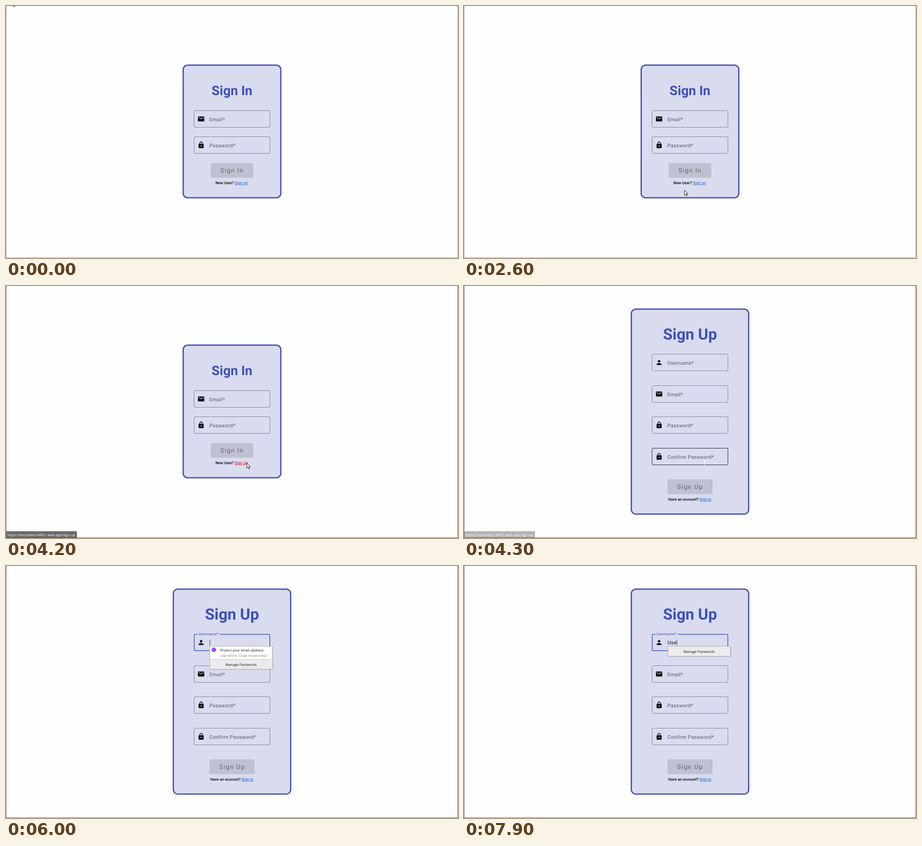
Recreate the animation shown at these times as an HTML page. Size 1001x560 px, loop 8000 ms.

```html
<!DOCTYPE html>
<html lang="en">
<head>
<meta charset="utf-8">
<title>Sign in and sign up</title>
<style>
  html, body { margin: 0; width: 100%; height: 100%; overflow: hidden; background: #fefefe; }
  svg { display: block; width: 100vw; height: 100vh; }
  text { font-family: Roboto, sans-serif; text-rendering: geometricPrecision; white-space: pre; }
  .card { fill: #d9dbef; stroke: #3f51b5; stroke-width: 2.8; }
  .title { font-weight: 700; fill: #3f51b5; text-anchor: middle; }
  .box { fill: none; stroke: rgba(0,0,0,.4); }
  .box.hover { stroke: rgba(0,0,0,.87); }
  .label, .value { font-size: 11.2px; letter-spacing: .36px; }
  .label { fill: #575860; }
  .label.focus { fill: #3f51b5; }
  .value { fill: #111; }
  .button { fill: #bfc1d2; }
  .action { font-size: 14px; font-weight: 500; letter-spacing: 1.3px; fill: #767883; }
  .note { font-size: 8.5px; font-weight: 500; fill: #000; }
  .link { font-size: 8.6px; font-weight: 400; fill: #0f64c8; text-decoration: underline; }
  .link.active { fill: #ee0000; }
  .ui { font-family: "Open Sans", "Noto Sans", sans-serif; font-size: 7.7px; fill: #111; }
  .pop { stroke: #a9aab0; stroke-width: 1; }
  .shade { fill: rgba(0,0,0,.1); }
  .cursor { fill: #fff; stroke: #000; stroke-width: .9; stroke-linejoin: round; }
</style>
</head>
<body>
<svg viewBox="0 0 1001 560" preserveAspectRatio="none">
  <defs>
    <path id="mail" d="M20 4H4c-1.1 0-2 .9-2 2v12c0 1.1.9 2 2 2h16c1.1 0 2-.9 2-2V6c0-1.1-.9-2-2-2zm0 4l-8 5-8-5V6l8 5 8-5v2z"/>
    <path id="lock" d="M18 8h-1V6c0-2.76-2.24-5-5-5S7 3.24 7 6v2H6c-1.1 0-2 .9-2 2v10c0 1.1.9 2 2 2h12c1.1 0 2-.9 2-2V10c0-1.1-.9-2-2-2zm-6 9c-1.1 0-2-.9-2-2s.9-2 2-2 2 .9 2 2-.9 2-2 2zm3.1-9H8.9V6c0-1.71 1.39-3.1 3.1-3.1s3.1 1.39 3.1 3.1v2z"/>
    <path id="person" d="M12 12c2.21 0 4-1.79 4-4s-1.79-4-4-4-4 1.79-4 4 1.79 4 4 4zm0 2c-2.67 0-8 1.34-8 4v2h16v-2c0-2.66-5.33-4-8-4z"/>
  </defs>

  <rect width="1001" height="560" fill="#fefefe"/>
  <path id="frame" d="M.5 0V559.5H1000.5V0" fill="none"/>

  <g id="signIn">
    <rect class="card" x="392.4" y="131.4" width="216.2" height="294.8" rx="10"/>
    <text class="title" x="500.5" y="198" font-size="29">Sign In</text>
    <rect class="button" x="453.3" y="349" width="94.4" height="32.6" rx="2.7"/>
    <text class="action" x="474.5" y="370.4">Sign In</text>
    <text class="note" x="464" y="396.2">New User? <tspan class="link" id="upLink">Sign up</tspan></text>
  </g>

  <g id="signUp">
    <rect class="card" x="370.6" y="51.4" width="259.8" height="455.4" rx="10"/>
    <text class="title" x="500.5" y="119.3" font-size="34.4">Sign Up</text>
    <rect class="button" x="450.6" y="429.6" width="99.8" height="32.8" rx="2.7"/>
    <text class="action" x="472" y="451">Sign Up</text>
    <text class="note" x="452" y="476.7">Have an account? <tspan class="link">Sign In</tspan></text>
  </g>

  <path id="focus" d="M473 151.8H582a2.3 2.3 0 0 1 2.3 2.3V186a2.3 2.3 0 0 1 -2.3 2.3H419a2.3 2.3 0 0 1 -2.3 -2.3V154.1a2.3 2.3 0 0 1 2.3 -2.3H424"
        fill="none" stroke="#3f51b5" stroke-width="1.5"/>
  <text id="typed" class="value" x="450.7" y="174.4"></text>
  <rect id="caret" y="164" width="1" height="13" fill="#333"/>
  <path id="beam" d="M-2 -5.5H2M0 -5.5V5.5M-2 5.5H2" fill="none" stroke="#fff" stroke-opacity=".9"/>

  <g id="popFull">
    <rect class="shade" x="451" y="179" width="141" height="52" rx="2"/>
    <rect class="pop" x="451.5" y="178.5" width="138.5" height="50.5" rx="1.5" fill="#fff"/>
    <path d="M452 207.5H589.5V228.5H452Z" fill="#ececec"/>
    <path d="M452 207.5H589.5" stroke="#c4c4c8"/>
    <circle cx="460.2" cy="186.3" r="5" fill="#a945ea"/>
    <text class="ui" x="474" y="189.8">Protect your email address:</text>
    <text class="ui" x="474" y="202.2" style="fill:#7c7c7c">Use Velirto Cloak email mask</text>
    <text class="ui" x="520.6" y="221.8" text-anchor="middle">Manage Passwords</text>
  </g>
  <g id="popSmall">
    <rect class="shade" x="451" y="179" width="141" height="23" rx="2"/>
    <rect class="pop" x="451.5" y="178.5" width="138.5" height="22" rx="1.5" fill="#ececec"/>
    <text class="ui" x="520.6" y="193" text-anchor="middle">Manage Passwords</text>
  </g>

  <g id="status">
    <rect x="1" y="545" width="156" height="14.5" fill="#2b2b2b"/>
    <text class="ui" x="3" y="555.6" style="font-size:7.8px;fill:#fff">https://reminders-4f421.web.app/sign-up</text>
  </g>

  <path id="arrow" class="cursor" d="M.4 .5V11.6L3 9.3L4.7 13.2L6.4 12.5L4.7 8.6H7.9Z"/>
  <path id="hand" class="cursor" d="M-1 10.3L-3.4 7.4C-4.2 6.2 -2.8 5.2 -1.8 6.2L-.8 7.2V1C-.8 -.3 1.2 -.3 1.2 1V5C1.6 4.2 3 4.3 3.1 5.3C3.6 4.7 4.9 4.9 5 5.9C5.6 5.5 6.9 5.8 6.9 7V10.6C6.9 12.6 5.8 13.4 5.6 15.4H.8C.7 13.2 -.2 11.6 -1 10.3Z"/>
</svg>

<script>
const $ = id => document.getElementById(id);
const LOOP = 8000, STEP = 100;

function add(parent, tag, attrs, text) {
  const el = document.createElementNS("http://www.w3.org/2000/svg", tag);
  for (const key in attrs) el.setAttribute(key, attrs[key]);
  if (text) el.textContent = text;
  return parent.appendChild(el);
}

function addField(group, top, icon, name) {
  const box = add(group, "rect", { class: "box", x: 416.5, y: top + .5, width: 168, height: 37, rx: 2.5 });
  add(group, "use", { href: "#" + icon, transform: `translate(423.7 ${top + 10.6}) scale(.7)` });
  const label = add(group, "text", { class: "label" }, name + "*");
  const field = { top, box, label };
  placeLabel(field, 0);
  return field;
}

// Moves a label from inside its field (0) up to the border (1).
function placeLabel({ top, label }, k) {
  const x = 450.4 - 24 * k, y = top + 24 - 20.6 * k;
  label.setAttribute("transform", `translate(${x} ${y}) scale(${1 - .25 * k})`);
}

addField($("signIn"), 232, "mail", "Email");
addField($("signIn"), 290, "lock", "Password");
const fields = [
  [151, "person", "Username"], [221, "mail", "Email"],
  [290, "lock", "Password"], [360, "lock", "Confirm Password"]
].map(row => addField($("signUp"), ...row));

// Pointer: time, x, y
const path = [
  [300, 13, -11], [1200, 131, 263], [1400, 194, 339], [1500, 194, 339],
  [1600, 225, 361], [2000, 349, 393], [2400, 473, 414], [2500, 473, 414],
  [2900, 533, 393], [4600, 533, 393], [5100, 421, 193], [5500, 460, 173]
];
const typing = [[0, "", 451], [7400, "U", 458.5], [7700, "Us", 465], [7900, "Use", 471]];
const status = [[0, 0], [3100, .5], [3200, 1], [4200, .7], [4300, .35], [4400, 0]];
const floating = [[0, 0], [5800, .4], [6000, 1]];

const rowAt = (table, t) => table.filter(row => row[0] <= t).pop();

function pointer(t) {
  const next = path.findIndex(p => p[0] > t);
  if (next === 0) return path[0].slice(1);
  if (next < 0) return path[path.length - 1].slice(1);
  const a = path[next - 1], b = path[next], k = (t - a[0]) / (b[0] - a[0]);
  return [1, 2].map(i => a[i] + (b[i] - a[i]) * k);
}

const show = (id, on) => $(id).style.display = on ? "" : "none";

function draw(t) {
  const up = t >= 4300, focused = t >= 5800;
  show("signIn", !up);
  show("signUp", up);
  $("frame").setAttribute("stroke", t < 4000 ? "#a3a3a3" : "#6e6e6e");
  $("upLink").classList.toggle("active", t >= 4000);
  $("status").style.opacity = rowAt(status, t)[1];

  const [x, y] = pointer(t);
  let over = null;
  for (const f of fields) {
    const hit = up && x >= 416 && x <= 585 && y >= f.top && y <= f.top + 38;
    if (hit) over = f;
    f.box.classList.toggle("hover", hit);
  }

  fields[0].box.style.display = focused ? "none" : "";
  fields[0].label.classList.toggle("focus", focused);
  placeLabel(fields[0], rowAt(floating, t)[1]);
  show("focus", focused);

  const [, text, caretX] = rowAt(typing, t);
  $("typed").textContent = text;
  $("caret").setAttribute("x", caretX);
  show("caret", t >= 6000 && !(t >= 6400 && t < 6900));
  show("popFull", t >= 6000 && t < 7500);
  show("popSmall", t >= 7500);

  const kind = t >= 7400 ? "" : over && x >= 451 ? "beam" : t >= 2900 && t < 4100 ? "hand" : "arrow";
  for (const id of ["arrow", "hand", "beam"]) {
    show(id, id === kind);
    $(id).setAttribute("transform", `translate(${x} ${y})`);
  }
}

const start = performance.now();
let last = -1;
function tick() {
  const t = Math.floor((performance.now() - start) % LOOP / STEP) * STEP;
  if (t !== last) draw(last = t);
  requestAnimationFrame(tick);
}
tick();
</script>
</body>
</html>
```
